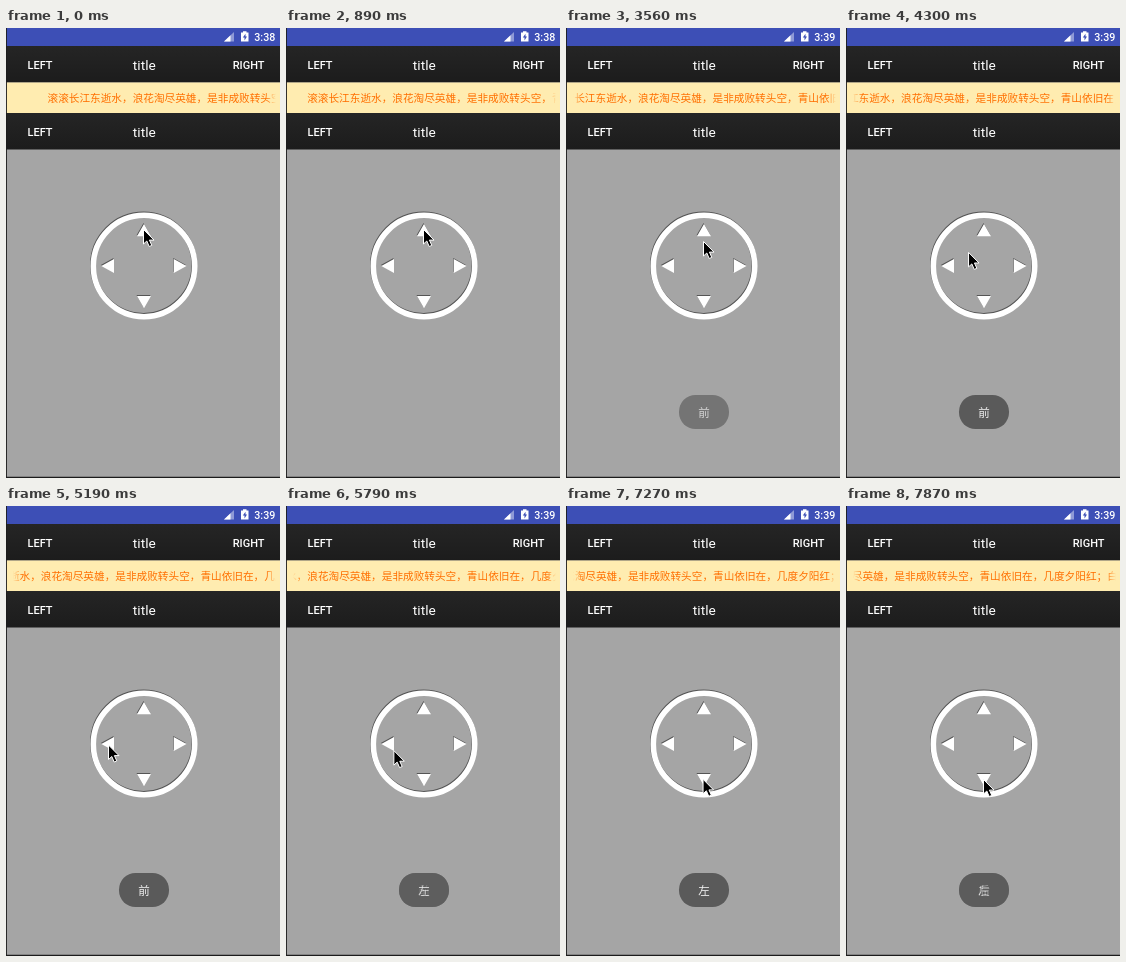
Animation, 274 px wide and 450 px high, one loop 8 s. Source, as an HTML page:

```html
<!DOCTYPE html>
<html lang="zh-CN">
<head>
<meta charset="utf-8">
<style>
  html, body { margin: 0; height: 100%; overflow: hidden; background: #a5a5a5; }
  svg { display: block; width: 100vw; height: 100vh; font-family: Roboto, "Noto Sans CJK SC", "Noto Sans CJK", sans-serif; fill: #fff; }
  .cjk { font-family: "Noto Sans CJK SC", "Noto Sans CJK", sans-serif; }
  .btn { font-size: 11px; font-weight: 500; }
  .title { font-size: 13.7px; text-anchor: middle; }
  .toast text { font-size: 11.5px; text-anchor: middle; fill: #f0f0f0; }
</style>
</head>
<body>
<svg viewBox="0 0 274 450">
  <defs>
    <linearGradient id="bar" x2="0" y2="1">
      <stop stop-color="#252525"/><stop offset="1" stop-color="#1c1c1c"/>
    </linearGradient>
    <linearGradient id="fade">
      <stop stop-color="#ffecb0"/><stop offset="1" stop-color="#ffecb0" stop-opacity="0"/>
    </linearGradient>
    <g id="pad">
      <circle cx="138" cy="238" r="50.7" fill="none" stroke-width="5.6"/>
      <path stroke="none" d="M138 196l7 12.3h-14zM138 280.3l-7-12.3h14zM95.3 238l12.7-7v14zM180.5 238l-12.7-7v14z"/>
    </g>
  </defs>

  <rect width="274" height="450" fill="#a5a5a5"/>
  <rect width="274" height="18" fill="#3d4fb6"/>
  <path d="M228 4v9.5h-10z" fill="#8f9ad6"/>
  <path d="M224.500 7.300v6.200h-6.500z"/>
  <path d="M235 4.500h2v-1.300h3.500v1.300h2v9h-7.500z"/>
  <path d="M239.500 5.800l-2.700 3.800h1.700v2.800l2.500-3.900h-1.500z" fill="#3d4fb6"/>
  <text id="clock" x="269.300" y="12.800" text-anchor="end" font-size="10.7" font-weight="500"></text>

  <rect y="18" width="274" height="36.500" fill="url(#bar)"/>
  <text class="btn" x="21.500" y="40.500">LEFT</text>
  <text class="title" x="138.300" y="41.500">title</text>
  <text class="btn" x="258.500" y="40.500" text-anchor="end">RIGHT</text>

  <rect y="54.500" width="274" height="30.500" fill="#ffecb0"/>
  <text id="verse" class="cjk" y="73.700" font-size="10.65" fill="#ff6f00">滚滚长江东逝水，浪花淘尽英雄，是非成败转头空，青山依旧在，几度夕阳红；白发渔樵江渚上，惯看秋月春风</text>
  <g id="leftFade">
    <rect y="55" width="7" height="29" fill="#ffecb0"/>
    <rect x="7" y="55" width="9" height="29" fill="url(#fade)"/>
  </g>
  <rect x="270" y="55" width="4" height="29" fill="#ffecb0"/>
  <rect x="-270" y="55" width="9" height="29" fill="url(#fade)" transform="scale(-1 1)"/>

  <rect y="85" width="274" height="36.500" fill="url(#bar)"/>
  <text class="btn" x="21.500" y="107.500">LEFT</text>
  <text class="title" x="138.300" y="108.500">title</text>

  <use href="#pad" x="-.5" y="-1" fill="#555" stroke="#555"/>
  <use href="#pad" fill="#fff" stroke="#fff"/>

  <g id="toasts"></g>
  <path d="M0 0v450M0 449.700h274" stroke="#1c1c1c" stroke-width="1.800" fill="none"/>
  <path id="cursor" d="M.5 .5v14.500l3.300-3 2.400 5.500 2.600-1.100-2.400-5.300h4.600z" fill="#000" stroke="#fff"/>
</svg>
<script>
const LOOP = 8000, STEP = 148.49;
const SPEED = 22.8, REST = 6.6, RESUME = 2.7;
const $ = id => document.getElementById(id);
const clamp = v => Math.max(0, Math.min(1, v));

// [seconds, x, y] of the pointer tip
const path = [
  [0, 137, 201], [2, 137, 201], [2.37, 137, 204], [2.8, 137, 205], [3.4, 137, 213],
  [3.9, 137, 213], [4.8, 102, 238.5], [5.5, 102, 238.5], [6.6, 133, 271],
  [6.8, 133, 271], [7.4, 137, 273], [8, 137, 273]
];

const toasts = [['前', 3.38, 5.57], ['左', 5.57, 7.75], ['后', 7.75, 10]].map(([label, start, end]) => {
  $('toasts').insertAdjacentHTML('beforeend',
    `<g class="toast cjk"><rect x="113" y="367" width="50" height="34" rx="16.500" fill="#5a5a5a"/><text x="138" y="388.500">${label}</text></g>`);
  return { node: $('toasts').lastChild, start, end };
});

function pointer(t) {
  const i = path.findIndex(p => p[0] > t);
  const [t0, x0, y0] = path[i - 1], [t1, x1, y1] = path[i];
  const p = (t - t0) / (t1 - t0), e = p * p * (3 - 2 * p);
  return [x0 + (x1 - x0) * e, y0 + (y1 - y0) * e];
}

function draw(t) {
  $('clock').textContent = t < 2.2 ? '3:38' : '3:39';
  const x = t < RESUME ? Math.max(REST, 41.5 - SPEED * t) : REST - SPEED * (t - RESUME);
  $('verse').setAttribute('x', x);
  $('leftFade').setAttribute('opacity', clamp((REST - x) / 4));
  $('cursor').setAttribute('transform', `translate(${pointer(t)})`);
  for (const { node, start, end } of toasts) {
    const fadeIn = 1 - (1 - clamp((t - start) / .45)) ** 2;
    const fadeOut = 1 - clamp((t - end) / .45) ** 2;
    node.setAttribute('opacity', fadeIn * fadeOut);
  }
}

function tick() {
  const ms = performance.now() % LOOP;
  draw(Math.floor((ms + 8) / STEP) * STEP / 1000);
  requestAnimationFrame(tick);
}
tick();
</script>
</body>
</html>
```
